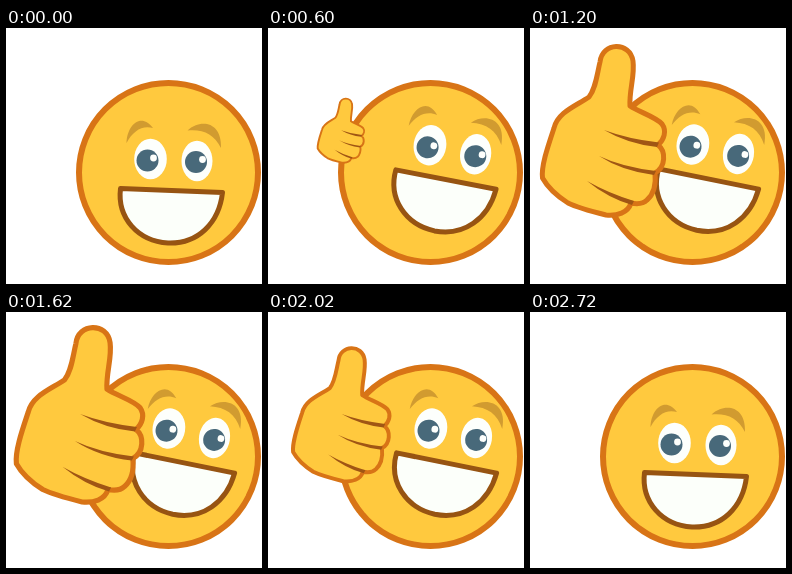
Recreate the animation shown at these times as an HTML page. Size 256 by 256 pixels, loop 2820 ms.

```html
<!DOCTYPE html>
<html lang="en">
<head>
<meta charset="utf-8">
<title>Thumbs up</title>
<style>
  html, body { margin: 0; width: 100%; height: 100%; overflow: hidden; background: #fff; }
  svg { display: block; width: 100%; height: 100%; }
  .skin { fill: #ffc93e; stroke: #d87416; stroke-linejoin: round; }
  .brow { fill: #d19b30; }
  .eye { fill: #fdfffc; }
  .iris { fill: #48697a; }
  .mouth { fill: #fcfffa; stroke: #975412; stroke-width: 5; stroke-linejoin: round; }
  .fold { fill: #a05614; }
</style>
</head>
<body>
<svg viewBox="0 0 256 256">
  <circle class="skin" cx="162.5" cy="144.5" r="89.5" stroke-width="6"/>

  <g id="features">
    <path class="brow" d="M120.5 115C121 97 135 84 147 100C136 97 127 103 120.5 115Z"/>
    <path class="brow" d="M181.500 102.500C194 91 216 93 215 120C208 106 197 101 181.500 102.500Z"/>
    <ellipse class="eye" cx="144.5" cy="131" rx="16.3" ry="20.3"/>
    <ellipse class="eye" cx="191" cy="133" rx="15.500" ry="20.3"/>
    <g id="pupils">
      <circle class="iris" cx="141.500" cy="132.500" r="11"/>
      <circle class="eye" cx="147.5" cy="130" r="3.4"/>
      <circle class="iris" cx="190" cy="134" r="11"/>
      <circle class="eye" cx="196.500" cy="131.500" r="3.4"/>
    </g>
    <path class="mouth" d="M114.500 160.500L216.500 164.500C213 195 192 216 162 215C132 213 111 190 114.500 160.500Z"/>
  </g>

  <g id="hand">
    <path class="skin" stroke-width="5" d="M70 34C72 14 100 13 103 33C105 48 99 62 100 78C109 84 126 89 132 96C137 103 134 112 128 117
      C136 123 136 139 125 145C126 155 124 166 117 172C113 176 106 176 101 175C98 185 87 188 76 187
      C64 184 48 180 38 175C27 168 18 160 12.500 150C11 138 18 118 24 100C28 84 46 78 59 69C66 60 67 46 70 34Z"/>
    <path class="fold" d="M74 102Q98 111 129 114.500L127 119Q98 116 74 102Z"/>
    <path class="fold" d="M69 128Q92 139 126 143L124 147Q92 143 69 128Z"/>
    <path class="fold" d="M57 153Q78 165 104 173L102 177Q78 170 57 153Z"/>
  </g>
</svg>
<script>
  const LOOP = 2820, STEP = 100, LAST = 12, HOLD_END = 1620;
  const HAND_START = 6, TURN_STEPS = 7;
  const handScales = [0.38, 0.79, 1.035, 1.12, 1.09, 1.035, 1];
  const [features, pupils, hand] =
    ["features", "pupils", "hand"].map(id => document.getElementById(id));

  // Twelve steps forward, a hold, then the same steps backward.
  function poseAt(time) {
    return time < HOLD_END
      ? Math.min(LAST, Math.floor(time / STEP))
      : LAST - 1 - Math.floor((time - HOLD_END) / STEP);
  }

  function draw(pose) {
    const turn = (1 - Math.cos(Math.PI * Math.min(1, pose / TURN_STEPS))) / 2;
    features.setAttribute("transform",
      `translate(${13 * turn} ${-11.5 * turn}) rotate(${9.2 * turn} 165.5 163)`);
    pupils.setAttribute("transform", `translate(${turn} ${turn})`);

    const scale = handScales[pose - HAND_START] || 0;
    hand.style.display = scale ? "" : "none";
    hand.setAttribute("transform",
      `translate(72.5 102.5) scale(${scale}) translate(-72.5 -102.5)`);
  }

  const start = performance.now();
  function tick() {
    draw(poseAt((performance.now() - start) % LOOP));
    requestAnimationFrame(tick);
  }
  tick();
</script>
</body>
</html>
```
